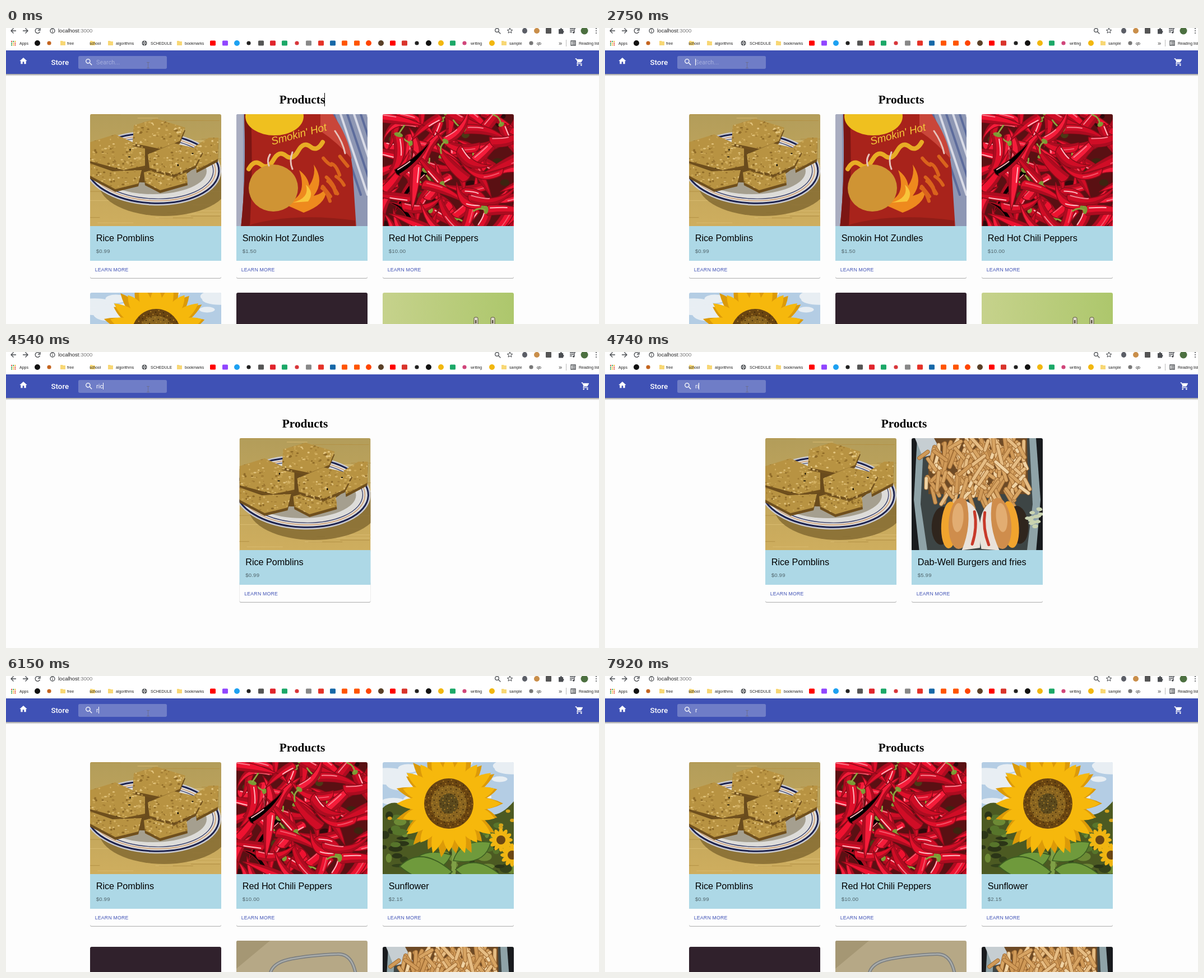
An HTML page that plays this animation: 1058x529 px, repeating every 8 s.

```html
<!DOCTYPE html>
<html lang="en">
<head>
<meta charset="utf-8">
<title>Store</title>
<style>
html, body { margin: 0; height: 100%; overflow: hidden; background: #fdfdfd; }
svg { display: block; }
#stage { width: 100vw; height: 100vh; }
text { font-family: "Liberation Sans", Arial, sans-serif; white-space: pre; }
.mark { font-size: 7px; fill: #222; }
.name { font-size: 16.2px; }
.price { font-size: 9.6px; letter-spacing: .2px; fill: #000; fill-opacity: .54; }
.more { font-size: 8.7px; letter-spacing: .25px; fill: #3f51b5; }
.field { font: 10.67px Roboto, sans-serif; letter-spacing: .1px; }
.brand { font: 500 13.33px Roboto, sans-serif; fill: #fff; }
.line { fill: none; stroke: #4a4d51; stroke-width: 1.3; }
#title { font: bold 21.33px "Liberation Serif", "Times New Roman", serif; text-anchor: middle; }
</style>
</head>
<body>
<svg id="stage" viewBox="0 0 1058 529"></svg>
<script>
let seed = 7;
const rnd = (a = 0, b = 1) => {
  seed = (seed * 16807) % 2147483647;
  return +(a + (b - a) * seed / 2147483647).toFixed(1);
};
const pick = list => list[Math.floor(rnd(0, list.length - .01))];
const many = (n, fn) => Array.from({ length: n }, (_, i) => fn(i)).join('');
const rect = (x, y, w, h, fill, more = '') =>
  `<rect x="${x}" y="${y}" width="${w}" height="${h}" fill="${fill}" ${more}/>`;
const oval = (x, y, rx, ry, fill, more = '') =>
  `<ellipse cx="${x}" cy="${y}" rx="${rx}" ry="${ry}" fill="${fill}" ${more}/>`;
const poly = (points, fill) => `<polygon points="${points}" fill="${fill}"/>`;
const path = (d, fill, more = '') => `<path d="${d}" fill="${fill}" ${more}/>`;
const curve = (d, color, width) =>
  path(d, 'none', `stroke="${color}" stroke-width="${width}" stroke-linecap="round"`);
const text = (x, y, cls, s, more = '') => `<text x="${x}" y="${y}" class="${cls}" ${more}>${s}</text>`;

// Product pictures, 234 x 200 each
function rice() {
  const blocks = [
    '0,50 45,36 98,60 98,92 60,100 0,84',
    '186,58 212,42 229,42 228,80 190,100',
    '0,88 40,102 92,100 86,124 45,134 0,110',
    '78,20 118,8 170,24 160,48 125,62 76,52',
    '96,104 130,94 172,104 174,122 125,136 98,122',
    '103,72 150,52 202,64 188,92 150,108 106,96'];
  const ring = (rx, ry, fill, stroke, w) =>
    oval(112, 97, rx, ry, fill, `transform="rotate(3 112 97)" stroke="${stroke}" stroke-width="${w}"`);
  return rect(0, 0, 234, 204, 'url(#table)') +
    many(40, () => rect(rnd(-30, 200), rnd(0, 200), rnd(30, 90), 1, pick(['#b39145', '#d9bb70']))) +
    oval(132, 124, 116, 58, '#80672f', 'opacity=".8"') +
    ring(121, 65, '#dddcd9', '#c8c9d0', 2) + ring(118, 62, 'none', '#1d2350', 3) +
    ring(112, 57.5, 'none', '#cf9c70', 1.5) + ring(108, 54, 'none', '#2b3160', 1.2) +
    oval(112, 102, 96, 41, '#a59f8f') + oval(96, 86, 92, 36, '#694b1d') +
    blocks.map(b => `<g transform="translate(0 5)">${poly(b, '#6f4f1d')}</g>` + poly(b, '#b89342')).join('') +
    `<g clip-path="url(#blocks)">` + many(700, () =>
      oval(rnd(0, 232), rnd(4, 142), rnd(1, 2.8), rnd(.8, 2), pick(['#e2c47e', '#d3b062', '#8f6b28', '#a37d34', '#c9a554']))) + '</g>' +
    `<clipPath id="blocks">${blocks.map(b => poly(b, '#000')).join('')}</clipPath>`;
}

function chips() {
  return rect(0, 0, 234, 204, '#8e97b4') +
    many(9, i => curve(`M${172 + i * 12} -6l50 150`, i % 2 ? '#d9dbe6' : '#5d6c9c', 4)) +
    rect(0, 0, 12, 204, '#a9adc0') +
    path('M14 0H172Q206 50 208 110L214 204H8Q18 110 14 0Z', '#a8231b') +
    path('M14 0Q18 110 8 204H24Q30 100 26 0Z', '#7c1613') +
    path('M150 0H172Q200 40 206 80Q180 50 150 30Z', '#c9463a') +
    oval(68, 4, 52, 34, '#efc01f') +
    `<text x="64" y="55" font-size="19" font-style="italic" fill="#f4c93a" transform="rotate(-15 64 55)">Smokin' Hot</text>` +
    curve('M22 98q10 -18 22 -8t22 -8t22 -8t22 -8t22 -8t22 -8', '#e8ac25', 8) +
    path('M84 160Q130 150 112 100Q128 112 130 128Q142 110 138 90Q158 120 138 146Q160 140 158 128Q168 158 120 176Z', '#ee8a1e') +
    path('M100 158Q132 150 124 126Q140 140 128 156Z', '#f8c53a') +
    many(9, () => { const x = rnd(150, 194), y = rnd(70, 140); return curve(`M${x} ${y}q8 ${rnd(2, 14)} 14 ${rnd(12, 24)}`, '#d9631c', 6); }) +
    oval(66, 132, 44, 42, '#cf9434') +
    path('M30 196Q110 176 212 190V204H10Z', '#8f1d17') +
    curve('M100 68Q94 84 100 98M60 72Q54 82 58 92M176 30Q190 50 194 70', '#e6c3bb', 3);
}

// A tapered pepper from a to b, bent towards c
function pepper(i) {
  const x = (i * 37) % 250 - 8 + rnd(-8, 8), y = (i * 53) % 216 - 6 + rnd(-8, 8);
  const turn = Math.round(rnd(0, 360)), l = rnd(30, 46), b = rnd(-34, 34), w = rnd(7, 10);
  const body = path(`M${-l} ${-w}Q0 ${b - w} ${l} 0Q0 ${b + w} ${-l} ${w}Q${-l - 6} 0 ${-l} ${-w}Z`,
    pick(['#ee1230', '#e0102b', '#f51c3a', '#d00d26']), 'stroke="#8a0a18" stroke-width="1.5"');
  return `<g transform="translate(${x} ${y}) rotate(${turn})">` + body +
    path(`M${-l} ${w}Q0 ${b + w} ${l} 0Q0 ${b + w - 7} ${-l} ${w - 5}Z`, '#ad0c20') +
    curve(`M${4 - l} ${-w / 2}Q${-l / 2} ${b / 3 - w / 2} ${-l / 4} ${b / 2.4 - w / 2}`, pick(['#ffb9c0', '#f7808f', '#f5566a']), 2) +
    (i % 3 ? '' : oval(-l - 3, 0, 4, w - 2, '#7c9a35') + curve(`M${-l - 5} 0q-10 ${rnd(-6, 6)} -20 ${rnd(-12, 12)}`, '#8aa63e', 2.8)) + '</g>';
}
const chili = () => rect(0, 0, 234, 204, '#5a1013') +
  many(20, () => oval(rnd(0, 234), rnd(0, 204), rnd(5, 12), rnd(4, 9), pick(['#3d2410', '#4b3a16', '#2e0a0c']))) + many(84, pepper);

function flower() {
  const petals = (n, off, len, fill) => many(n, i =>
    path(`M-8 -34Q-17 -64 0 -${len + (i * 7) % 14}Q17 -64 8 -34Z`, fill, `transform="rotate(${i * 360 / n + off})"`));
  const leaf = (x, y, a, s) => path('M0 0Q14 -24 48 -12Q36 14 0 0Z', '#6f9a3c',
    `transform="translate(${x} ${y}) rotate(${a}) scale(${s})" stroke="#3d5f22"`);
  const small = (x, y) => many(12, i => oval(0, -12, 4, 9, '#f0b512', `transform="translate(${x} ${y}) rotate(${i * 30})"`)) + oval(x, y, 8, 8, '#6b4714');
  return rect(0, 0, 234, 204, '#b4cde4') +
    many(24, () => oval(rnd(0, 234), rnd(0, 75), rnd(12, 36), rnd(5, 13), '#e8eef3')) +
    path('M0 82Q20 62 50 84T110 82T170 84T234 70V204H0Z', '#4c5a22') +
    many(90, () => oval(rnd(0, 234), rnd(90, 204), rnd(4, 14), rnd(3, 8), pick(['#33421b', '#57752b', '#6d8a35', '#2b3517']))) +
    many(22, () => oval(rnd(0, 234), rnd(86, 125), 4, 3, '#d8a51b')) +
    curve('M124 120Q130 160 126 204', '#7fa046', 8) +
    leaf(126, 176, -12, 1.5) + leaf(122, 166, 175, 1.6) + leaf(124, 196, 200, 1.9) + leaf(130, 192, 20, 1.6) +
    small(211, 139) + small(231, 166) +
    `<g transform="translate(118 74)">` + petals(22, 8, 90, '#dc9a08') + petals(20, 0, 86, '#f6b80c') +
    oval(0, 0, 44, 45, '#6a4511') + oval(0, 0, 32, 33, '#8a6520') + oval(0, 0, 17, 18, '#5c4a1d') +
    many(150, i => { const a = i * 2.4, r = 3.5 * Math.sqrt(i); return oval((r * Math.cos(a)).toFixed(1), (r * Math.sin(a)).toFixed(1), 1.1, 1.1, i % 2 ? '#3d280b' : '#b58528'); }) + '</g>';
}

function fries() {
  const burger = (x, lean) => `<g transform="translate(${x} 154) rotate(${lean})">` +
    oval(-30, 4, 18, 34, '#2f251d') + oval(-16, 2, 15, 42, '#f0a42e') +
    oval(2, -2, 20, 46, '#cf8d4c') + oval(-2, -12, 10, 26, '#e2ad72') +
    path('M12 -42Q44 -30 40 40L8 46Q24 0 12 -42Z', '#e9e2da') +
    curve('M27 -24Q34 4 26 34', '#c83a2a', 5) + '</g>';
  return rect(0, 0, 234, 204, '#191b1e') + poly('10,0 222,0 230,110 222,204 14,204 4,110', '#8fa3a8') +
    poly('22,0 210,0 216,118 206,200 28,200 16,118', '#3d4545') + poly('30,0 206,0 208,100 30,100', '#6d4a26') +
    poly('6,0 40,0 54,26 20,34', '#c6ced2') +
    many(200, () => {
      const d = `M${rnd(26, 202)} ${rnd(-4, 96)}l${rnd(-22, 22)} ${rnd(10, 34)}`;
      return curve(d, '#a06c34', 7.5) + curve(d, pick(['#d7a463', '#e6bd84', '#d09a58', '#f0d3a4']), 5.5);
    }) +
    burger(84, 3) + `<g transform="translate(234) scale(-1 1)">${burger(74, 6)}</g>` +
    many(14, () => oval(rnd(205, 232), rnd(126, 160), 5, 3, '#c9d3b0'));
}

const dark = () => rect(0, 0, 234, 204, '#30212c');
const plug = () => rect(0, 0, 234, 204, 'url(#lime)') +
  [163, 193].map(x => rect(x, 44, 7, 60, '#ddd8cb', 'stroke="#5a5340" rx="2"') + rect(x + 2, 49, 2.5, 6, '#5a5340')).join('');
const cable = () => {
  const d = 'M60 62Q62 40 96 33T180 24Q206 22 213 60';
  return rect(0, 0, 234, 204, '#b6a886') + poly('0,0 60,0 0,50', '#a59774') +
    curve(d, '#7e8080', 6) + curve(d, '#a9adad', 2.5);
};
const photos = { rice, chips, chili, flower, fries, dark, plug, cable };

const goods = {
  rice: ['Rice Pomblins', '$0.99'],
  chips: ['Smokin Hot Zundles', '$1.50'],
  chili: ['Red Hot Chili Peppers', '$10.00'],
  flower: ['Sunflower', '$2.15'],
  fries: ['Dab-Well Burgers and fries', '$5.99'],
};
const photo = (id, x, y) => `<use href="#${id}" x="${x}" y="${y}"/>`;
const cut = (id, x, h) => `<svg x="${x}" y="154" width="234" height="${h}">${photo(id, 0, 0)}</svg>`;
const card = (id, x, image = photo(id, x, 154)) =>
  rect(x, 410, 234, 38, '#b9b9b9', 'rx="3"') + rect(x, 154, 234, 292.8, '#fdfdfd', 'rx="3"') + image +
  rect(x, 354, 234, 62, '#add8e6') + text(x + 10.7, 381, 'name', goods[id][0]) +
  text(x + 10.7, 402, 'price', goods[id][1]) + text(x + 8.7, 435, 'more', 'LEARN MORE');

const [A, B, C] = [150, 411, 672];
const views = {
  all: card('rice', A) + card('chips', B) + card('chili', C) +
    photo('flower', A, 473) + photo('dark', B, 473) + photo('plug', C, 473),
  loading: card('rice', A) + card('chips', B, cut('chips', B, 33.5)) + card('chili', C) +
    photo('flower', 98, 484) + photo('dark', 359, 484) + photo('cable', 724, 473),
  r: card('rice', A) + card('chili', B) + card('flower', C) +
    photo('dark', A, 484) + photo('cable', B, 473) + photo('fries', C, 484),
  blank: card('rice', 286) + card('fries', 547, ''),
  ri: card('rice', 286) + card('fries', 547),
  ric: card('rice', 416.5),
  re: card('chili', 416.5),
};

// Browser bar
const dot = (x, c) => oval(x, 27, 5, 5, c);
const box = (x, c) => rect(x - 5, 22.5, 10, 9, c, 'rx="1.5"');
const folder = x => path(`M${x - 4} 23h4l1 1h4v7h-9z`, '#f8d775');
const folders = [101, 154, 186, 309, 888];
const labels = [[24, 'Apps'], [109, 'free'], [149, 'school'], [196, 'algorithms'], [258, 'SCHEDULE'],
  [319, 'bookmarks'], [829, 'writing'], [898, 'sample'], [947, 'qb'], [1022, 'Reading list']];
const dots = [[56, '#111'], [412, '#1da1f2'], [647, '#ff4500'], [669, '#5a4028'], [754, '#111'], [776, '#f2b70f'], [867, '#f2b70f']];
const boxes = [[369, '#f00'], [391, '#9146ff'], [455, '#555'], [476, '#e0242c'], [497, '#1ba868'], [540, '#888'],
  [562, '#e53228'], [583, '#1668a8'], [604, '#f50'], [626, '#f50'], [690, '#f00'], [711, '#d9342b'], [797, '#1ba868']];
const tiny = [[77, '#c4651f'], [433, '#222'], [519, '#d8363a'], [733, '#222'], [818, '#d0457a'], [937, '#777']];
const browser = rect(0, 0, 1058, 39.5, '#fff') +
  path('M18 5H9m4.500 -4.500L9 5l4.500 4.500M30 5h9m-4.500 -4.500L39 5l-4.500 4.500M60 2.500A4.300 4.300 0 1 0 60.500 6.500M61 0v4h-4', 'none', 'class="line"') +
  `<circle cx="83" cy="5" r="4" class="line" stroke-width="1"/>` + rect(82.4, 4.5, 1.2, 3, '#555') + rect(82.4, 2.4, 1.2, 1.2, '#555') +
  `<text x="93" y="8" font-size="9.500" fill="#222">localhost<tspan fill="#777">:3000</tspan></text>` +
  `<circle cx="876" cy="4" r="3.300" class="line"/>` + curve('M879 7l3 3', '#4a4d51', 1.3) +
  path('M899 0l1.300 3.300 3.500 .2 -2.700 2.200 .9 3.400 -3 -1.900 -3 1.900 .9 -3.400 -2.700 -2.200 3.500 -.2z', 'none', 'stroke="#4a4d51"') +
  oval(925.5, 5, 4.5, 5, '#5b5e66') + oval(947, 5, 5, 5, '#c98e4a') + rect(963, 0, 10, 10, '#555', 'rx="1"') +
  path('M986 2h2.500a1.800 1.800 0 0 1 3.600 0h2v3a1.800 1.800 0 0 1 0 3.500v2h-8z', '#4a4d51') +
  path('M1006 1h7M1006 4h7M1006 7h4M1014 8V1h2', 'none', 'class="line"') + oval(1012.7, 8, 1.7, 1.7, '#4a4d51') +
  oval(1032, 5, 6.5, 6.5, '#4c7040') + [1, 5, 9].map(y => oval(1053, y, 1, 1, '#4a4d51')).join('') +
  many(9, i => rect(9 + i % 3 * 3.2, 23 + Math.floor(i / 3) * 3.2, 2, 2, ['#e0453a', '#2f9e55', '#f0b429'][(i + (i > 2)) % 3])) +
  folders.map(folder).join('') + dots.map(d => dot(...d)).join('') + boxes.map(b => box(...b)).join('') +
  tiny.map(([x, c]) => oval(x, 27, 3.6, 3.6, c)).join('') +
  oval(247, 27, 4.5, 4.5, '#4a4d51') + path('M243 27h8M247 23q-3 4 0 8q3 -4 0 -8', 'none', 'stroke="#fff" stroke-width=".7"') +
  labels.map(([x, s]) => text(x, 29.5, 'mark', s)).join('') +
  `<text x="986" y="30.500" font-size="11" fill="#444">»</text>` + rect(999, 21, 1, 12, '#bbb') +
  path('M1008 23h8v8h-8zM1010 25.500h5M1010 28.500h5', 'none', 'class="line" stroke-width="1"');

// Store bar
const icon = (id, x, y, d) => path(d, '#fff', `id="${id}" transform="translate(${x} ${y}) scale(.667)"`);
const bar = rect(0, 82, 1058, 4, 'url(#shade)') + rect(0, 40, 1058, 42, '#3f51b5') +
  icon('home', 23, 51, 'M10 20v-6h4v6h5v-8h3L12 3 2 12h3v8z') + text(80.5, 65.5, 'brand', 'Store') +
  rect(129, 50, 158, 23, '#6f7dc7', 'rx="2.700"') +
  icon('lens', 140, 53, 'M15.5 14h-.79l-.28-.27A6.500 6.500 0 1 0 13.730 14.430l.27.28v.79l5 4.990L20.490 19zM9.500 14a4.500 4.500 0 1 1 0-9a4.500 4.500 0 0 1 0 9z') +
  icon('cart', 0, 53, 'M7 18a2 2 0 1 0 0 4a2 2 0 0 0 0-4zM1 2v2h2l3.600 7.590-1.350 2.450C4.500 15.400 5.500 17 7 17h12v-2H7.420a.25.25 0 0 1-.22-.37l.9-1.630h7.450c.75 0 1.410-.41 1.750-1.030l3.580-6.490A1 1 0 0 0 20 4H5.210l-.94-2zM17 18a2 2 0 1 0 0 4a2 2 0 0 0 0-4z') +
  path('M251 61.500h5M253.500 62v9M251 71.500h5', 'none', 'stroke="#6b6f93"') +
  text(161, 65, 'field', 'Search...', 'id="hint" fill="#a5aedd"') + text(161, 65, 'field', '', 'id="typed" fill="#fff"') +
  rect(161, 55, 1, 12, '#fff', 'id="caret"');

const grad = (id, dir, a, b) => `<linearGradient id="${id}" x2="${dir}" y2="${1 - dir}">` +
  `<stop ${a}/><stop offset="1" ${b}/></linearGradient>`;
const $ = id => document.getElementById(id);
$('stage').innerHTML = '<defs>' +
  grad('table', 0, 'stop-color="#b39d5a"', 'stop-color="#cfae5e"') +
  grad('lime', 1, 'stop-color="#c6d28c"', 'stop-color="#adc76c"') +
  grad('shade', 0, 'stop-opacity=".4"', 'stop-opacity="0"') +
  `<clipPath id="frame"><rect width="234" height="204" rx="3"/></clipPath>` +
  Object.keys(photos).map(id => `<g id="${id}" clip-path="url(#frame)">${photos[id]()}</g>`).join('') + '</defs>' +
  rect(0, 0, 1058, 529, '#fdfdfd') + browser + bar +
  text(528.5, 135, '', 'Products', 'id="title"') + rect(568, 116, 1, 24, '#000', 'id="mark"') +
  Object.keys(views).map(v => `<g id="view-${v}">${views[v]}</g>`).join('');

// [start ms, view, typed text, caret: 0 none, 1 field, 2 title]
const steps = [
  [0, 'all', '', 2], [60, 'all', '', 0], [560, 'all', '', 2], [1090, 'all', '', 0], [1640, 'all', '', 2],
  [1690, 'all', '', 1], [2190, 'all', '', 0], [2750, 'all', '', 1], [2990, 'r', 'r', 1], [3180, 'ri', 'ri', 1],
  [3570, 'ric', 'ric', 1], [4040, 'ric', 'ric', 0], [4220, 'ric', 'rice', 1], [4540, 'ric', 'ric', 1],
  [4710, 'blank', 'ri', 1], [4740, 'ri', 'ri', 1], [4950, 'r', 'r', 1], [5070, 'loading', '', 0],
  [5110, 'all', '', 0], [5250, 'all', '', 1], [5750, 'all', '', 0], [6150, 'r', 'r', 1],
  [6550, 're', 're', 1], [7050, 're', 'red', 1], [7620, 're', 're', 0], [7920, 'r', 'r', 0]];
const show = (id, on) => { $(id).style.display = on ? '' : 'none'; };
let last, start;

function draw(now) {
  start ??= now;
  const t = (now - start) % 8000;
  const step = steps.findLast(s => s[0] <= t);
  if (step !== last) {
    last = step;
    const [, view, typed, caret] = step;
    const short = ['blank', 'ri', 'ric', 're'].includes(view);
    for (const v in views) show('view-' + v, v === view);
    show('hint', !typed);
    show('caret', caret === 1);
    show('mark', caret === 2);
    $('typed').textContent = typed;
    $('caret').setAttribute('x', 161 + Math.round(typed ? $('typed').getComputedTextLength() : 0));
    $('title').setAttribute('x', short ? 533.5 : 528.5);
    $('cart').setAttribute('transform', `translate(${short ? 1026 : 1015} 53) scale(.667)`);
  }
  requestAnimationFrame(draw);
}
draw(performance.now());
</script>
</body>
</html>
```
